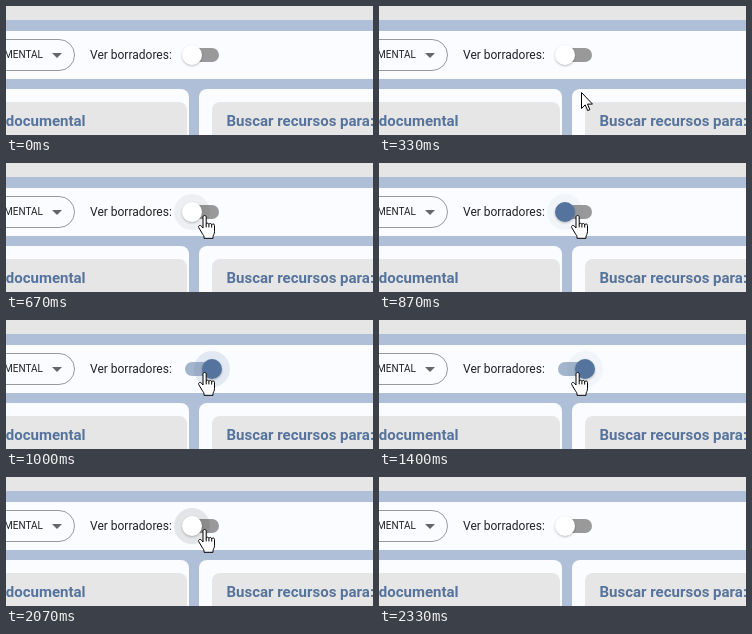
An HTML page for the animation above (3400 ms loop, 367 by 129 pixels).

```html
<!DOCTYPE html>
<html lang="es">
<head>
<meta charset="utf-8">
<title>Ver borradores</title>
<style>
  html, body { margin: 0; width: 100%; height: 100%; overflow: hidden; background: #b0bfd8; }
  svg { display: block; width: 367px; height: 129px; font-family: Roboto, sans-serif; }
  .panel { fill: #fafcff; }
  .head { fill: #e6e6e6; }
  .title { font-size: 15px; font-weight: 700; fill: #55739c; }
  .knob, .track, .halo, .thumb, .arrow, .hand { animation: 3400ms step-end infinite; }
  .knob { animation-name: slide; }
  .track { animation-name: track; }
  .halo { animation-name: halo; }
  .thumb { animation-name: thumb; filter: drop-shadow(0 1px 1px rgba(0, 0, 0, .25)); }
  .arrow { animation-name: arrow; }
  .hand { animation-name: hand; }
  .cursor { fill: #fff; stroke: #000; stroke-linejoin: round; }

  @keyframes slide {
    0% { transform: translateX(0); }
    27.35% { transform: translateX(16px); }
    29.4% { transform: translateX(20px); }
    58.8% { transform: translateX(4px); }
    60.8%, 100% { transform: translateX(0); }
  }
  @keyframes track {
    0% { fill: #999; }
    27.35% { fill: #a0abba; }
    29.4% { fill: #a3b5cc; }
    58.8% { fill: #9ca2ab; }
    60.8%, 100% { fill: #999; }
  }
  @keyframes thumb {
    0% { fill: #fff; }
    25.58% { fill: #54749e; }
    56.76%, 100% { fill: #fff; }
  }
  @keyframes halo {
    0% { fill: #000; opacity: 0; }
    15.58% { fill: #000; opacity: .05; }
    25.58% { fill: #54749e; opacity: .05; }
    27.35% { fill: #54749e; opacity: .09; }
    29.4% { fill: #54749e; opacity: .13; }
    33.2% { fill: #54749e; opacity: .1; }
    35.25% { fill: #54749e; opacity: .07; }
    37.35% { fill: #54749e; opacity: .05; }
    56.76% { fill: #000; opacity: .06; }
    58.8% { fill: #000; opacity: .09; }
    62.64% { fill: #000; opacity: .05; }
    66.76%, 100% { fill: #000; opacity: 0; }
  }
  @keyframes arrow {
    0% { transform: translate(400px, 150px); }
    3.82% { transform: translate(278px, 122px); }
    5.88% { transform: translate(246px, 109px); }
    7.94% { transform: translate(221px, 97px); }
    9.7% { transform: translate(202px, 86px); }
    11.76% { transform: translate(191px, 76px); }
    13.82% { transform: translate(186px, 69px); }
    15.58% { transform: translate(400px, 150px); }
    66.76% { transform: translate(185px, 79px); }
    68.52%, 100% { transform: translate(400px, 150px); }
  }
  @keyframes hand {
    0% { transform: translate(400px, 150px); }
    15.58% { transform: translate(188px, 60px); }
    17.64% { transform: translate(190px, 53px); }
    19.7% { transform: translate(192px, 52px); }
    66.76%, 100% { transform: translate(400px, 150px); }
  }
</style>
</head>
<body>
<svg viewBox="0 0 367 129">
  <rect width="367" height="129" fill="#b0bfd8"/>
  <rect class="head" width="367" height="14"/>
  <rect class="panel" y="25" width="367" height="48"/>

  <rect x="-60" y="33.5" width="128.5" height="31" rx="15.5" fill="none" stroke="#999"/>
  <text x="37" y="52" font-size="10" text-anchor="end" fill="#222">DOCUMENTAL</text>
  <path d="M46 47h10l-5 5z" fill="#666"/>
  <text x="84" y="53" font-size="12" fill="#222">Ver borradores:</text>

  <rect class="panel" x="-20" y="83" width="203" height="70" rx="8"/>
  <rect class="head" x="-20" y="96" width="201" height="70" rx="8"/>
  <text class="title" x="79.5" y="120" text-anchor="end">documental</text>

  <rect class="panel" x="193" y="83" width="200" height="70" rx="8"/>
  <rect class="head" x="206" y="96" width="200" height="70" rx="8"/>
  <text class="title" x="220.5" y="120">Buscar recursos para:</text>

  <rect class="track" x="179" y="42" width="34" height="14" rx="7"/>
  <g class="knob">
    <circle class="halo" cx="186" cy="49" r="18"/>
    <circle class="thumb" cx="186" cy="49" r="10"/>
  </g>

  <g class="cursor">
    <path class="arrow" d="M.5.5V16.5l3.7-3.6 2.5 5.7 2.2-.9-2.4-5.6h5z"/>
    <g class="hand">
      <path d="M6.6.5C5.5.5 5 1.3 5 2.1V13l-1.5-1.8c-.8-.9-2-1-2.6-.3-.5.6-.4 1.3 0 2l3.6 6c.8 1.2 1.5 1.8 1.5 3v1.4h9v-1.6c0-1 1.5-2.7 1.5-5V10.4c0-1.8-2.4-1.8-2.8-.6-.2-1.6-2.4-1.8-2.8-.4-.3-1.5-2.4-1.6-2.7-.3V2.1C8.2 1.3 7.7.5 6.6.5z"/>
      <path d="M8.2 9v3.4M10.9 9.4v3M13.7 9.8v2.8" fill="none"/>
    </g>
  </g>
</svg>
</body>
</html>
```
